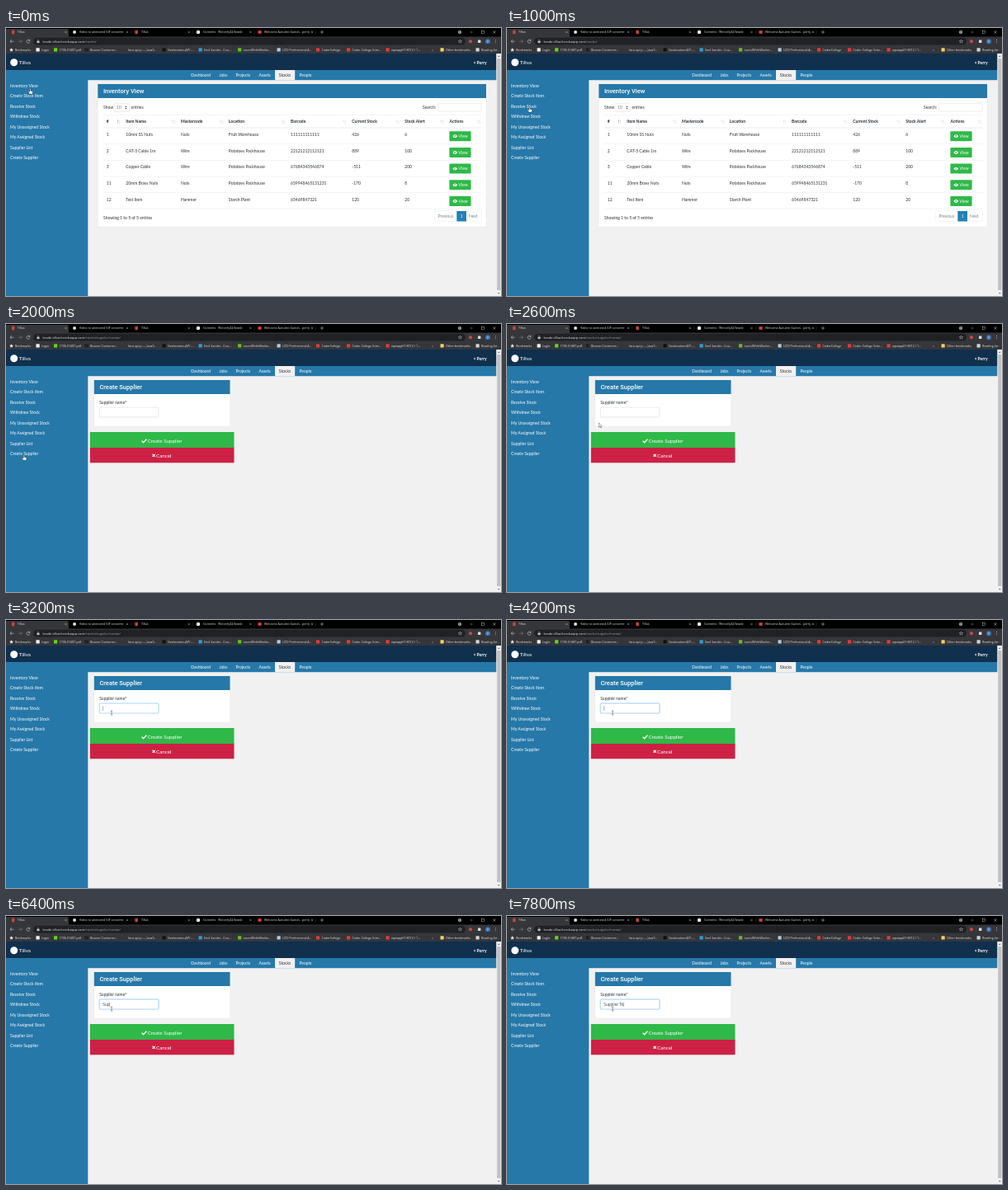
An HTML page that plays this animation: 600 by 325 pixels, repeating every 8000 ms.

```html
<!DOCTYPE html>
<html lang="en">
<head>
<meta charset="utf-8">
<title>Create a supplier</title>
<style>
  html, body { margin: 0; width: 100%; height: 100%; overflow: hidden; background: #f1f1f1; }
  svg { display: block; width: 100vw; height: 100vh; }
  text { font: 5px Lato, sans-serif; fill: #2b2f33; white-space: pre; }
  .chrome text { font: 3.65px "Open Sans", sans-serif; fill: #dfe1e5; }
  .light text { fill: #fff; }
  text.title { font: 500 7.5px Roboto, sans-serif; fill: #fff; }
  text.bold { font-weight: 700; }
</style>
</head>
<body>
<svg id="stage" viewBox="0 0 600 325"></svg>
<script>
const LOOP = 8000, STEP = 200;
const BLUE = '#2678a9', GREEN = '#2fb948';
const stage = document.getElementById('stage');
let parent = stage;

function add(tag, attrs = {}, text) {
  const el = document.createElementNS('http://www.w3.org/2000/svg', tag);
  for (const key in attrs) el.setAttribute(key, attrs[key]);
  if (text !== undefined) el.textContent = text;
  return parent.appendChild(el);
}
function group(attrs, draw) {
  const outer = parent, g = add('g', attrs);
  parent = g;
  draw();
  parent = outer;
  return g;
}
const rect = (x, y, width, height, fill, more) => add('rect', { x, y, width, height, fill, ...more });
const circle = (cx, cy, r, fill) => add('circle', { cx, cy, r, fill });
const label = (x, y, text, more) => add('text', { x, y, ...more }, text);
const line = (d, stroke, width = 0.5, more) =>
  add('path', { d, stroke, fill: 'none', 'stroke-width': width, ...more });
const fill = (d, color, more) => add('path', { d, fill: color, ...more });
const cross = (x, y, r, color, width) =>
  line(`M${x - r} ${y - r}l${2 * r} ${2 * r}m0 ${-2 * r}l${-2 * r} ${2 * r}`, color, width);

let favicon, reloadIcon, stopIcon, path, stocksPage, formPage;

function drawTabs() {
  rect(0, 0, 600, 11, '#000');
  fill('M0 11V2Q0 1 2 1H74Q76 1 76 3V11Z', '#35363a');
  favicon = rect(7, 2.8, 3.4, 4.4, '#c9463c');
  circle(83, 5, 2, '#dedede');
  rect(156.4, 2.8, 3.4, 4.4, '#c9463c');
  circle(233, 5, 2.2, '#fff');
  rect(305.5, 3.2, 4, 3.6, '#d8463b');
  [[14, 'Tillva'], [89, 'Video to animated GIF converte'], [164, 'Tillva'],
   [239, 'Commits · Winterly42/brade'], [313, 'Welcome Autumn Guests - perry']]
    .forEach(([x, name]) => label(x, 6.3, name));
  [72.5, 147, 222, 296.5, 371].forEach(x => cross(x, 5, 1.1, '#ddd', 0.4));
  [151, 226, 301, 375.5].forEach(x => rect(x, 2.5, 0.3, 5, '#555'));
  line('M381 5h4m-2 -2v4M562.5 5h3M590.5 3.5l3 3m0 -3l-3 3', '#eee', 0.45);
  rect(576.7, 3.5, 2.8, 2.8, 'none', { stroke: '#eee', 'stroke-width': 0.4 });
  circle(550, 5, 2.1, '#aaa');
  fill('M549 4.5h2l-1 1.2Z', '#111');
}

function drawToolbar() {
  rect(0, 10.5, 600, 20.7, '#35363a');
  rect(33, 11.8, 524, 8.8, '#202124', { rx: 4.4 });
  line('M9.5 16.2h-4.5m2 -2l-2 2l2 2', '#e8eaed');
  line('M15 16.2h4.5m-2 -2l2 2l-2 2', '#8b8d91');
  reloadIcon = line('M28.5 15a2 2 0 1 0 .4 1.8M29 13.6v1.8h-1.8', '#e8eaed');
  stopIcon = group({}, () => cross(27, 16.2, 1.6, '#e8eaed', 0.5));
  rect(37.5, 15.8, 3, 2.3, '#c4c7cc');
  line('M38.2 16v-1a.8 .8 0 0 1 1.6 0v1', '#c4c7cc', 0.4);
  const url = label(44.5, 17.6, '', { style: 'font-size:3.95px' });
  const outer = parent;
  parent = url;
  add('tspan', {}, 'brade-tillva.herokuapp.com');
  path = add('tspan', { fill: '#9aa0a6' });
  parent = outer;
  fill('M550.5 14l.6 1.4 1.6 .1-1.2 1 .4 1.6-1.4-.9-1.4 .9 .4-1.6-1.2-1 1.6-.1Z', 'none',
    { stroke: '#ddd', 'stroke-width': 0.4 });
  circle(563, 16.2, 2, '#d34a43');
  rect(572, 14.5, 3.4, 3.4, '#dcdcdc', { rx: 0.5 });
  circle(584, 16.2, 2.9, '#3a78c2');
  label(582.9, 17.6, 'P');
  [14.5, 16.2, 17.9].forEach(y => circle(593.5, y, 0.45, '#eee'));
}

function drawBookmarks() {
  fill('M6.5 24l.7 1.7 1.8 .1-1.4 1.1 .5 1.8-1.6-1-1.6 1 .5-1.8-1.4-1.1 1.8-.1Z', '#e8eaed');
  [[11, 'Bookmarks'], [43, 'Login', '#f1f1f1'], [64.5, '1706.01407.pdf', '#60d21b'],
   [102, 'Beacon Customer...', '#202124'], [148, 'face-api.js — JavaS...'],
   [196, 'Geolocation API -...', '#111'], [240, 'Emil Sander - Coa...', '#2d9bd8'],
   [287.5, 'tunesWhileWorkin...', '#58c322'], [335, 'UCD Professional A...', '#a9c9e4'],
   [382.5, 'CoderCollege', '#df3b3b'], [419.5, 'Coder College Sche...', '#df3b3b'],
   [467, 'wpvapp01:8012 / 1...', '#df3b3b'], [516, '»'],
   [533, 'Other bookmarks', '#f5cf62'], [576, 'Reading list', '#d2d4d7']]
    .forEach(([x, name, color]) => {
      if (color) rect(x - 6.5, 24.3, 4.2, 4.2, color, { rx: 0.5 });
      label(x, 27.7, name);
    });
}

function drawShell() {
  rect(0, 31, 594.5, 20, '#10304d');
  circle(9.7, 41.8, 4.5, '#fff');
  rect(0, 51, 594.5, 12.2, BLUE);
  rect(0, 63, 99.3, 262, BLUE);
  rect(326, 51, 24.2, 12.2, '#f1f1f1');
  group({ class: 'light' }, () => {
    label(15.6, 43.7, 'Tillva', { style: 'font-size:6.25px' });
    label(570.5, 43.7, 'Perry', { class: 'bold' });
    fill('M567 42l1.6 -1.4v2.8Z', '#fff');
    [[224.3, 'Dashboard'], [258.5, 'Jobs'], [278.4, 'Projects'], [306.4, 'Assets'], [355.4, 'People']]
      .forEach(([x, name]) => label(x, 58.9, name));
    ['Inventory View', 'Create Stock Item', 'Receive Stock', 'Withdraw Stock', 'My Unassigned Stock',
     'My Assigned Stock', 'Supplier List', 'Create Supplier']
      .forEach((name, i) => label(5, 71.9 + 12.45 * i, name, { style: 'font-size:5.1px' }));
  });
  label(330.8, 58.9, 'Stocks');
  rect(594.5, 31, 5.5, 294, '#f1f1f1');
  rect(595.2, 37, 4.2, 281, '#c1c1c1');
  fill('M596 35h2.6l-1.3 -1.6ZM596 321h2.6l-1.3 1.6Z', '#555');
}

function drawCard(x, width, bottom, title) {
  rect(x, 68, width, bottom - 68, '#fff', { stroke: '#dfdfdf', 'stroke-width': 0.3, rx: 1.2 });
  rect(x, 68, width, 17, BLUE);
  label(x + 6.6, 79.2, title, { class: 'title' });
}

function drawStocks() {
  const columns = [121.8, 145.3, 212, 269.8, 345, 419.3, 483.3, 537.5];
  const border = { stroke: '#c9ced3', 'stroke-width': 0.35, rx: 0.8 };
  drawCard(111.3, 470.7, 241, 'Inventory View');
  label(118, 98, 'Show');
  rect(131, 91.5, 18.5, 10, '#fff', border);
  label(133.8, 98, '10', { style: 'fill:#777' });
  fill('M144.2 96h2.4l-1.2 -1.6ZM144.2 97h2.4l-1.2 1.6Z', '#444');
  label(151.6, 98, 'entries');
  label(505, 98, 'Search:');
  rect(523.7, 91.3, 52.5, 9.8, '#fff', border);

  ['#', 'Item Name', 'Mastercode', 'Location', 'Barcode', 'Current Stock', 'Stock Alert', 'Actions']
    .forEach((name, i) => label(columns[i], 115.3, name, { class: 'bold' }));
  [136.5, 203, 261.5, 336.5, 410.3, 474.3, 528.5, 573].forEach((x, i) => {
    line(`M${x - 1} 115.5v-4m-.8 1l.8 -1l.8 1`, i ? '#ccc' : '#777', 0.35);
    line(`M${x + 1} 111.5v4m-.8 -1l.8 1l.8 -1`, '#ccc', 0.35);
  });
  rect(118, 105.4, 458.5, 0.35, '#dee2e6');
  rect(118, 120.7, 458.5, 0.6, '#dee2e6');

  [['1', '10mm SS Nuts', 'Nuts', 'Fruit Warehouse', '111111111111', '426', '6'],
   ['2', 'CAT-5 Cable 1m', 'Wire', 'Potatoes Packhouse', '22121212112121', '889', '100'],
   ['3', 'Copper Cable', 'Wire', 'Potatoes Packhouse', '67684343546874', '-511', '200'],
   ['11', '20mm Brass Nuts', 'Nuts', 'Potatoes Packhouse', '659948465131231', '-170', '8'],
   ['12', 'Test Item', 'Hammer', 'Starch Plant', '65469847321', '120', '20']]
    .forEach((cells, row) => {
      const y = 121 + 19.7 * row;
      cells.forEach((cell, i) => label(columns[i], y + 9.8, cell));
      rect(537.4, y + 4.2, 26.2, 12, GREEN, { rx: 1 });
      fill(`M541.3 ${y + 10.2}q3 -3.8 6 0q-3 3.8 -6 0`, '#fff');
      circle(544.3, y + 10.2, 1.1, GREEN);
      circle(544.3, y + 10.2, 0.5, '#fff');
      label(548.6, y + 12, 'View', { style: 'fill:#fff' });
      rect(118, y + 19.5, 458.5, 0.35, '#dee2e6');
    });

  label(118, 231.6, 'Showing 1 to 5 of 5 entries');
  rect(519.5, 222, 57, 12.5, '#fff', { stroke: '#dee2e6', 'stroke-width': 0.35, rx: 1 });
  rect(546.3, 222, 11.7, 12.5, '#2580b5');
  label(523.5, 230.1, 'Previous', { style: 'fill:#7b838a' });
  label(550.7, 230.1, '1', { style: 'fill:#fff' });
  label(561, 230.1, 'Next', { style: 'fill:#7b838a' });
}

let halo, input, typed, caret;

function drawForm() {
  const big = { style: 'font-size:6.25px;fill:#fff' };
  drawCard(106.8, 164.7, 124.2, 'Create Supplier');
  label(113.2, 97, 'Supplier name*');
  halo = rect(112.6, 100.6, 73, 13, '#bfdeff', { rx: 1.6 });
  input = rect(113.3, 101.2, 71.5, 11.7, '#fff', { 'stroke-width': 0.4, rx: 1.1 });
  typed = label(117.3, 109, '', { style: 'fill:#495057' });
  caret = rect(117.3, 104.3, 0.35, 5.8, '#333');
  rect(101.8, 131, 174.7, 19.2, GREEN);
  rect(101.8, 150, 174.7, 18.3, '#cc2144');
  line('M164.6 141.8l2 2l3.8 -4', '#fff', 1.3);
  label(171.4, 143.9, 'Create Supplier', big);
  cross(179.1, 159.4, 1.5, '#fff', 1.3);
  label(182, 161.6, 'Cancel', big);
}

group({ class: 'chrome' }, () => { drawTabs(); drawToolbar(); drawBookmarks(); });
rect(0, 31, 600, 294, '#f1f1f1');
drawShell();
stocksPage = group({}, drawStocks);
formPage = group({}, drawForm);

// Pointer shapes share a hot spot at 0,0.
const outline = { stroke: '#222', 'stroke-width': 0.4 };
const pointers = {
  hand: group({}, () => fill('M-.6 0Q0 -.8 .6 0V2.2L2.6 2.8Q3.3 3 3.1 4L2.6 6H-.8L-2.5 3.5Q-2.4 2.5 -.6 3.6Z', '#fff', outline)),
  arrow: group({}, () => fill('M0 0V5.4L1.3 4.2L2.2 6.1L3 5.7L2.1 3.9H3.8Z', '#fff', outline)),
  beam: group({}, () => line('M-1.2 -2.6Q0 -2.6 0 -2V2Q0 2.6 -1.2 2.6M1.2 -2.6Q0 -2.6 0 -2M0 2Q0 2.6 1.2 2.6', '#222', 0.45)),
};

// time, field text, caret visible
const typing = [
  [0, '', 0], [3200, '', 1], [3800, '', 0], [4200, '', 1],
  [4400, 'T', 1], [4600, 'Te', 1], [4800, 'Tes', 1], [5200, 'Tes', 0], [5800, '', 1],
  [6000, 'S', 1], [6200, 'Su', 1], [6400, 'Sup', 1], [6600, 'Supp', 1], [6800, 'Suppl', 1],
  [7000, 'Suppli', 1], [7200, 'Supplie', 1], [7400, 'Supplier', 1],
  [7600, 'Supplier T', 1], [7800, 'Supplier Te', 1],
];

const show = (el, on) => el.setAttribute('visibility', on ? 'inherit' : 'hidden');
const mix = (a, b, p) => a + (b - a) * p;
function ease(t, from, to) {
  const p = Math.min(1, Math.max(0, (t - from) / (to - from)));
  return p * p * (3 - 2 * p);
}

function render(t) {
  const onForm = t >= 2000, loading = t >= 1800 && !onForm, focused = t >= 3200;
  show(stocksPage, !onForm);
  show(formPage, onForm);
  show(favicon, !loading);
  show(reloadIcon, !loading);
  show(stopIcon, loading);
  path.textContent = onForm ? '/stocks/supplier/create/' : '/stocks/';

  const down = ease(t, 600, 1800), across = ease(t, 2000, 2800);
  const x = mix(mix(29.3, 21.8, down), 128, across);
  const y = mix(mix(74, 159.2, down), 112.6, across);
  const shape = across === 1 ? 'beam' : across > 0 ? 'arrow' : 'hand';
  for (const name in pointers) {
    show(pointers[name], name === shape);
    pointers[name].setAttribute('transform', `translate(${x} ${y})`);
  }

  const [, text, caretOn] = typing.findLast(([start]) => t >= start);
  typed.textContent = text;
  caret.setAttribute('x', 117.3 + (text ? typed.getComputedTextLength() : 0));
  show(caret, onForm && caretOn);
  halo.setAttribute('opacity', focused ? (t < 3400 ? 0.7 : 1) : 0);
  input.setAttribute('stroke', focused ? '#6fb3f5' : '#c4cad0');
}

function frame() {
  render(Math.floor(performance.now() % LOOP / STEP) * STEP);
  requestAnimationFrame(frame);
}
frame();
</script>
</body>
</html>
```
